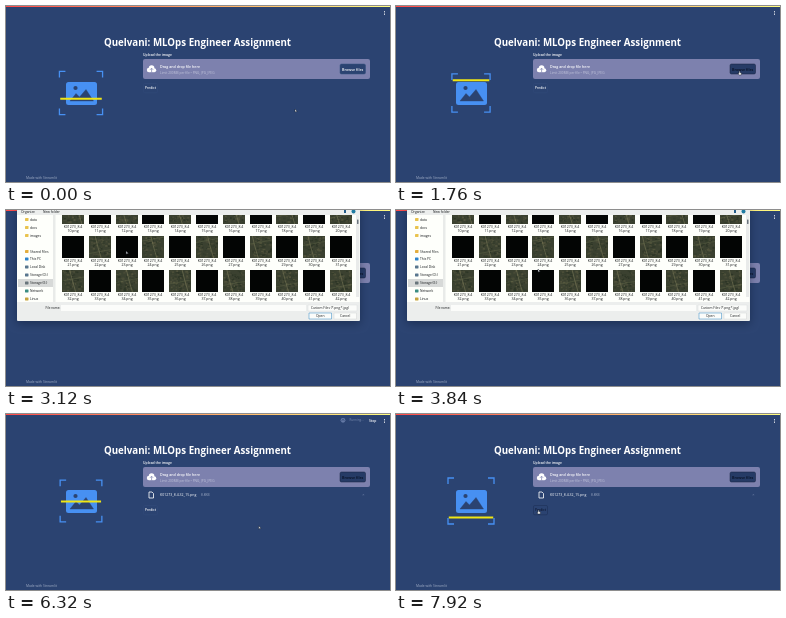
An HTML page with a canvas that plays this animation: 384 px wide and 176 px high, repeating every 8000 ms.

```html
<!DOCTYPE html>
<html lang="en">
<head>
<meta charset="utf-8">
<title>Image upload demo</title>
<style>
  html, body { margin: 0; width: 100%; height: 100%; overflow: hidden; background: #2b4371; }
  canvas { display: block; width: 384px; height: 176px; }
</style>
</head>
<body>
<canvas id="stage"></canvas>
<script>
const LOOP = 8000;
const SANS = '"Open Sans", "Noto Sans", sans-serif';
const NAVY = '#2b4371', BLUE = '#4790f2', YELLOW = '#f0e614', INK = '#15181a';

// Moments at which the interface changes, in ms
const OPEN = 2400, LOADED = 2720, SELECTED = 4400, CLOSED = 5760,
      UPLOADED = 6160, RUN_END = 7440;

// Pointer stops: time, x, y
const POINTER = [
  [0, 289, 103], [500, 289, 103], [1300, 343, 65], [2100, 343, 65],
  [2500, 110.5, 33], [2900, 110.5, 33], [3500, 142, 59], [3900, 142, 59],
  [4300, 174, 74], [4600, 174, 74], [5200, 314, 104], [5800, 314, 104],
  [6600, 229, 115], [7000, 229, 115], [7760, 142, 96], [8000, 142, 96]
];

const canvas = document.getElementById('stage');
const scale = window.devicePixelRatio || 1;
canvas.width = 384 * scale;
canvas.height = 176 * scale;
const ctx = canvas.getContext('2d');

const clamp = v => Math.max(0, Math.min(1, v));
const smooth = v => v * v * (3 - 2 * v);

function rect(x, y, w, h, fill, radius = 0, stroke) {
  ctx.beginPath();
  ctx.roundRect(x, y, w, h, radius);
  if (fill) { ctx.fillStyle = fill; ctx.fill(); }
  if (stroke) { ctx.strokeStyle = stroke; ctx.lineWidth = 0.5; ctx.stroke(); }
}

function text(str, x, y, size, color, weight = 400, align = 'left') {
  ctx.font = `${weight} ${size}px ${SANS}`;
  ctx.textAlign = align;
  ctx.fillStyle = color;
  ctx.fillText(str, x, y);
}

function line(points, color, width, fill) {
  ctx.beginPath();
  points.forEach(([x, y]) => ctx.lineTo(x, y));
  ctx.strokeStyle = color;
  ctx.lineWidth = width;
  if (fill) { ctx.closePath(); ctx.fillStyle = fill; ctx.fill(); }
  ctx.stroke();
}

function disc(x, y, r, color) {
  ctx.beginPath();
  ctx.arc(x, y, r, 0, Math.PI * 2);
  ctx.fillStyle = color;
  ctx.fill();
}

function random(seed) {
  return () => {
    seed = (seed * 16807) % 2147483647;
    return seed / 2147483647;
  };
}

function pointerAt(t) {
  const i = Math.max(1, POINTER.findIndex(p => p[0] > t));
  const [t0, x0, y0] = POINTER[i - 1], [t1, x1, y1] = POINTER[i];
  const k = smooth(clamp((t - t0) / (t1 - t0)));
  return [x0 + (x1 - x0) * k, y0 + (y1 - y0) * k];
}

function drawScanner(t) {
  const turns = t < 4000 ? (t + 340) / 1500 : (t - 6700) / 1400;
  const wave = Math.cos(turns * Math.PI * 2);
  const half = 21.2 + 2.6 * wave, arm = 6;
  for (const sx of [-1, 1]) for (const sy of [-1, 1]) {
    const x = 75 + sx * half, y = 87 + sy * half;
    line([[x - sx * arm, y], [x, y], [x, y - sy * arm]], BLUE, 1.3);
  }
  rect(60, 76, 31, 23, BLUE, 2.5);
  line([[64, 95], [70, 87.5], [73.5, 91], [80, 83.5], [87.5, 95]], NAVY, 0.4, NAVY);
  disc(69.5, 82, 2.1, NAVY);
  const y = 90 + 19.5 * wave;
  line([[75 - half + 0.8, y], [75 + half - 0.8, y]], YELLOW, 1.9);
}

function drawUploader(hover) {
  text('Upload the image', 137, 50.4, 3.4, '#fff', 600);
  rect(137, 53, 227, 20, '#7d81ae', 2);
  disc(143, 64, 2.2, '#fff');
  disc(145.6, 62, 2.8, '#fff');
  disc(148.2, 64.2, 2, '#fff');
  rect(143, 63.5, 5.2, 2.7, '#fff');
  line([[144, 63.8], [145.6, 62.2], [147.2, 63.8]], '#7d81ae', 0.7);
  line([[145.6, 62.4], [145.6, 66.4]], '#7d81ae', 0.7);
  text('Drag and drop file here', 154, 62.3, 3.6, '#fff', 600);
  text('Limit 200MB per file • PNG, JPG, JPEG', 154, 68, 3.2, '#c3c6dc');
  rect(334, 58, 25.5, 10, hover ? '#263b66' : NAVY, 1.5, hover ? '#14213f' : '#35507f');
  text('Browse files', 346.7, 64.5, 3.7, hover ? '#081023' : '#fff', 600, 'center');
}

function drawPage(t, overPredict) {
  rect(0, 0, 384, 176, NAVY);
  const bar = ctx.createLinearGradient(0, 0, 384, 0);
  bar.addColorStop(0, '#ff4b4b');
  bar.addColorStop(1, '#fffd80');
  rect(0, 0, 384, 1, bar);
  for (const y of [5.5, 7, 8.5]) disc(378.5, y, 0.5, '#fff');

  text('Quelvani: MLOps Engineer Assignment', 285, 39.6, 9.74, '#fff', 700, 'right');
  drawScanner(t);
  const uploaded = t >= UPLOADED;
  drawUploader(t > 1150);

  if (uploaded) {
    line([[143, 78], [146, 78], [147.5, 79.5], [147.5, 84], [143, 84], [143, 78]], '#fff', 0.8);
    text('K01273_8.4.32_15.png', 154, 82.2, 3.5, '#fff');
    text('8.8KB', 195, 82.2, 3.2, '#a8b3cb');
    text('×', 357.5, 82, 4, '#7486ab', 400, 'center');
  }
  const buttonY = uploaded ? 91.5 : 77.5;
  rect(137.5, buttonY, 14, 9.3, null, 1.3, overPredict ? '#1b2c52' : '#334b7a');
  text('Predict', 144.5, buttonY + 5.9, 3.2, overPredict ? '#0d1730' : '#fff', 600, 'center');

  if (uploaded && t < RUN_END) {
    disc(337, 6.3, 2.4, '#6479a5');
    line([[335.5, 7.2], [337, 5], [338.5, 7.2]], NAVY, 0.6);
    text('Running...', 343.5, 7.4, 3, '#7d8eb2');
    text('Stop', 363, 7.6, 3.4, '#fff', 600);
  }
  text('Made with Streamlit', 20, 172.8, 3.3, '#a3afc8');
}

function drawThumb(index, x, y) {
  const size = 22;
  if (index % 2) return rect(x, y, size, size, '#030504');
  const next = random(971 + index * 7919);
  next();
  rect(x, y, size, size, '#3b4130');
  const tones = ['#2d3526', '#474a36', '#50523b', '#343c2b'];
  for (let i = 0; i < 70; i++) {
    const w = 1 + next() * 2;
    rect(x + next() * (size - w), y + next() * (size - 2), w, 1 + next(), tones[i % 4]);
  }
  const a = 5 + next() * 12, b = 5 + next() * 14;
  line([[x + a - 3, y], [x + a, y + 12], [x + a + 3, y + size]], '#85835e', 0.5);
  line([[x, y + b], [x + size, y + b - 4]], '#686c4d', 0.4);
}

function drawFiles(selected) {
  ctx.save();
  ctx.beginPath();
  ctx.rect(50, 5, 298, 87);
  ctx.clip();
  if (selected) rect(162, 58, 25, 34, '#cce6f8', 0, '#90c8ee');
  for (let index = 0; index < 33; index++) {
    const row = Math.floor(index / 11);
    const x = Math.round(56 + index % 11 * 26.8), y = -8 + row * 34;
    drawThumb(index, x, y);
    text('K01273_8.4', x + 11, y + 26.2, 3.5, INK, 400, 'center');
    text(`${10 + index}.png`, x + 11, y + 30, 3.5, INK, 400, 'center');
  }
  ctx.restore();
}

function drawSidebar() {
  rect(12, 69, 35, 8, '#d7d9d8');
  const items = [
    [9.5, '#e9c34e', 'data'], [17.5, '#e9c34e', 'docs'], [25.5, '#e9c34e', 'images'],
    [41.5, '#e3ad3d', 'Shared Files'], [49, '#2b83cb', 'This PC'],
    [57, '#58768e', 'Local Disk'], [65, '#58768e', 'Storage (D:)'],
    [73, '#68757b', 'Storage (E:)'], [81, '#3b8d83', 'Network'], [89, '#c6a43f', 'Linux']
  ];
  items.forEach(([y, color, label]) => {
    rect(19, y - 1.5, 3.5, 3, color, 0.4);
    text(label, 24, y + 1.3, 3.3, INK);
  });
}

function drawDialog(t, overOpen) {
  const grow = 0.96 + 0.04 * (1 - (1 - clamp((t - OPEN) / 280)) ** 2);
  const loaded = t >= LOADED, selected = t >= SELECTED;
  ctx.save();
  ctx.translate(182, 55);
  ctx.scale(grow, grow);
  ctx.translate(-182, -55);
  ctx.shadowColor = 'rgba(5, 15, 40, .4)';
  ctx.shadowBlur = 8 * scale;
  ctx.shadowOffsetY = 2.5 * scale;
  rect(11, -4, 343, 115, '#eceeed', 1);
  ctx.shadowColor = 'transparent';
  rect(11, 5, 342.5, 87, '#fefffb');
  rect(47, 5, 2.5, 87, '#e9ebe9');
  rect(350, 5, 3, 82, '#e9ebea');
  rect(351, 9.5, 1.5, 4.5, '#6b747c', 0.5);
  rect(338, 0, 2, 3, '#245d8b');
  disc(347.5, 1.5, 2, '#217da3');

  if (loaded) {
    text('Organize', 15, 2.9, 3.3, INK);
    text('New folder', 37, 2.9, 3.3, INK);
    drawSidebar();
    drawFiles(selected);
  } else {
    rect(47.5, 9.5, 1.5, 37, '#7d8393', 0.7);
    text('Working on it...', 201, 12.6, 3, '#4a4e4c', 400, 'center');
  }

  rect(55, 95, 245, 6, '#fbfcfa');
  rect(302, 95, 49, 6, '#fbfcfa', 0, '#dadddd');
  rect(303, 103, 22.5, 6, overOpen ? '#d9ebf8' : '#fbfcfa', 0, loaded ? '#3088c7' : '#dadddd');
  rect(328, 103, 22.5, 6, '#fbfcfa', 0, '#d2d5d5');
  if (loaded) {
    text('File name:', 39.5, 99.3, 3.1, INK);
    text('Custom Files (*.png;*.jpg)', 305, 99.2, 3.2, INK);
    text('Open', 314.2, 107.2, 3.3, INK, 400, 'center');
    text('Cancel', 339.2, 107.2, 3.3, INK, 400, 'center');
    if (selected) text('K01273_8.4.32_15.png', 56.5, 99.3, 3.1, INK);
  } else {
    rect(40, 95.8, 14, 4.5, '#fbfcfa');
  }
  ctx.restore();
}

function drawPointer([x, y], hand) {
  const shape = hand
    ? [[0, 0], [0.8, 0], [0.9, 1.5], [2.4, 2], [2.2, 4], [0, 4], [-1.2, 2.3], [0, 2.4]]
    : [[0, 0], [0, 3.2], [0.9, 2.5], [2.2, 2.4]];
  line(shape.map(([dx, dy]) => [x + dx, y + dy]), '#1a2029', 0.45, '#fff');
}

function draw(t) {
  const pointer = pointerAt(t);
  const [x, y] = pointer;
  const dialog = t >= OPEN && t < CLOSED;
  const overBrowse = !dialog && x > 334 && y > 58 && y < 68;
  const overOpen = dialog && x > 303 && y > 103;
  const overPredict = t >= UPLOADED && x < 152 && y < 101;
  ctx.setTransform(scale, 0, 0, scale, 0, 0);
  drawPage(t, overPredict);
  if (dialog) drawDialog(t, overOpen);
  drawPointer(pointer, overBrowse || overOpen || overPredict);
}

const start = performance.now();
function tick() {
  draw((performance.now() - start) % LOOP);
  requestAnimationFrame(tick);
}
tick();
</script>
</body>
</html>
```
